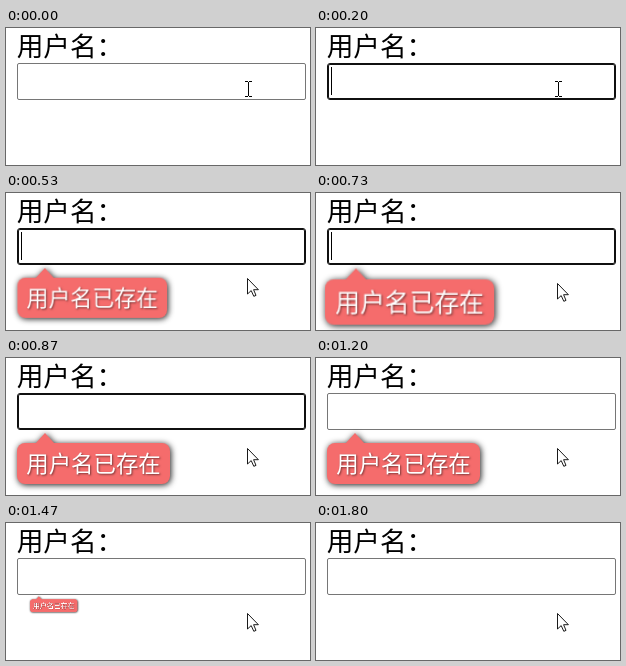
Write an HTML page that moves like this. It is 304 px wide and 137 px high and loops after 1870 ms.

```html
<!DOCTYPE html>
<html lang="zh-CN">
<head>
<meta charset="utf-8">
<title>用户名</title>
<style>
  :root { --loop: 1870ms; }

  html, body {
    margin: 0;
    width: 100%;
    height: 100%;
    overflow: hidden;
    background: #fff;
  }

  body {
    position: relative;
    font-family: "Noto Sans CJK SC", "Noto Sans CJK", sans-serif;
  }

  body > * { position: absolute; }

  .label {
    left: 10.67px;
    top: -1px;
    font-size: 26.67px;
    font-weight: 300;
    line-height: 36px;
    white-space: nowrap;
    color: #000;
  }

  .field {
    left: 11px;
    top: 35px;
    width: 289px;
    height: 37px;
    box-sizing: border-box;
    border: 1px solid #767676;
    border-radius: 2px;
    animation: focus var(--loop) step-end infinite;
  }

  .caret {
    left: 15px;
    top: 39px;
    width: 1px;
    height: 28px;
    background: #000;
    animation: caret var(--loop) step-end infinite;
  }

  .callout {
    left: 11px;
    top: 85px;
    width: 153px;
    height: 40.5px;
    border-radius: 8px;
    background: #f56c6c;
    filter: drop-shadow(1px 1px 3px rgba(0, 0, 0, .9));
    color: #fff;
    font-size: 22.4px;
    line-height: 39px;
    text-align: center;
    text-shadow: 1px 1px 2px rgba(0, 0, 0, .5);
    white-space: nowrap;
    transform-origin: 19px -12.5px;
    animation: pop var(--loop) infinite;
  }

  .callout::before {
    content: "";
    position: absolute;
    left: 18px;
    top: -10px;
    border: solid transparent;
    border-width: 0 10px 11px;
    border-bottom-color: #f56c6c;
  }

  .beam {
    left: 238px;
    top: 53px;
    animation: beam var(--loop) step-end infinite;
  }

  .arrow {
    left: 240px;
    top: 89px;
    animation: arrow var(--loop) step-end infinite;
  }

  svg { display: block; }

  @keyframes focus {
    0%, 64.1% { border-color: #767676; border-radius: 2px; box-shadow: none; }
    10.6% { border-color: #101010; border-radius: 3px; box-shadow: inset 0 0 0 1px #101010; }
  }

  @keyframes caret {
    0%, 42.7% { opacity: 0; }
    10.6% { opacity: 1; }
  }

  /* springy entrance, plain ease on the way out */
  @keyframes pop {
    0% { transform: scale(0); }
    13.37% { transform: scale(0); animation-timing-function: cubic-bezier(.25, .1, .3, 1.53); }
    45.45% { transform: scale(1); }
    67.2% { transform: scale(1); animation-timing-function: ease; }
    95.45%, 100% { transform: scale(0); }
  }

  @keyframes beam {
    0% { opacity: 1; }
    26.7%, 100% { opacity: 0; }
  }

  @keyframes arrow {
    0% { opacity: 0; transform: translateY(-5px); }
    26.7% { opacity: 1; transform: translateY(-5px); }
    31.9%, 100% { opacity: 1; transform: none; }
  }
</style>
</head>
<body>
  <div class="label">用户名：</div>
  <div class="field"></div>
  <div class="caret"></div>
  <div class="callout">用户名已存在</div>

  <svg class="beam" width="9" height="17" fill="none" stroke="#000" shape-rendering="crispEdges">
    <path d="M1 .5H4M5 .5H8M4.5 1V15M1 15.5H4M5 15.5H8"/>
  </svg>

  <svg class="arrow" width="15" height="22" fill="#fff" stroke="#000" stroke-width=".9">
    <path d="M1.5 1.5V17L5.2 13.6L7.8 19.3L10 18.4L7.6 12.7H12.4Z"/>
  </svg>
</body>
</html>
```
